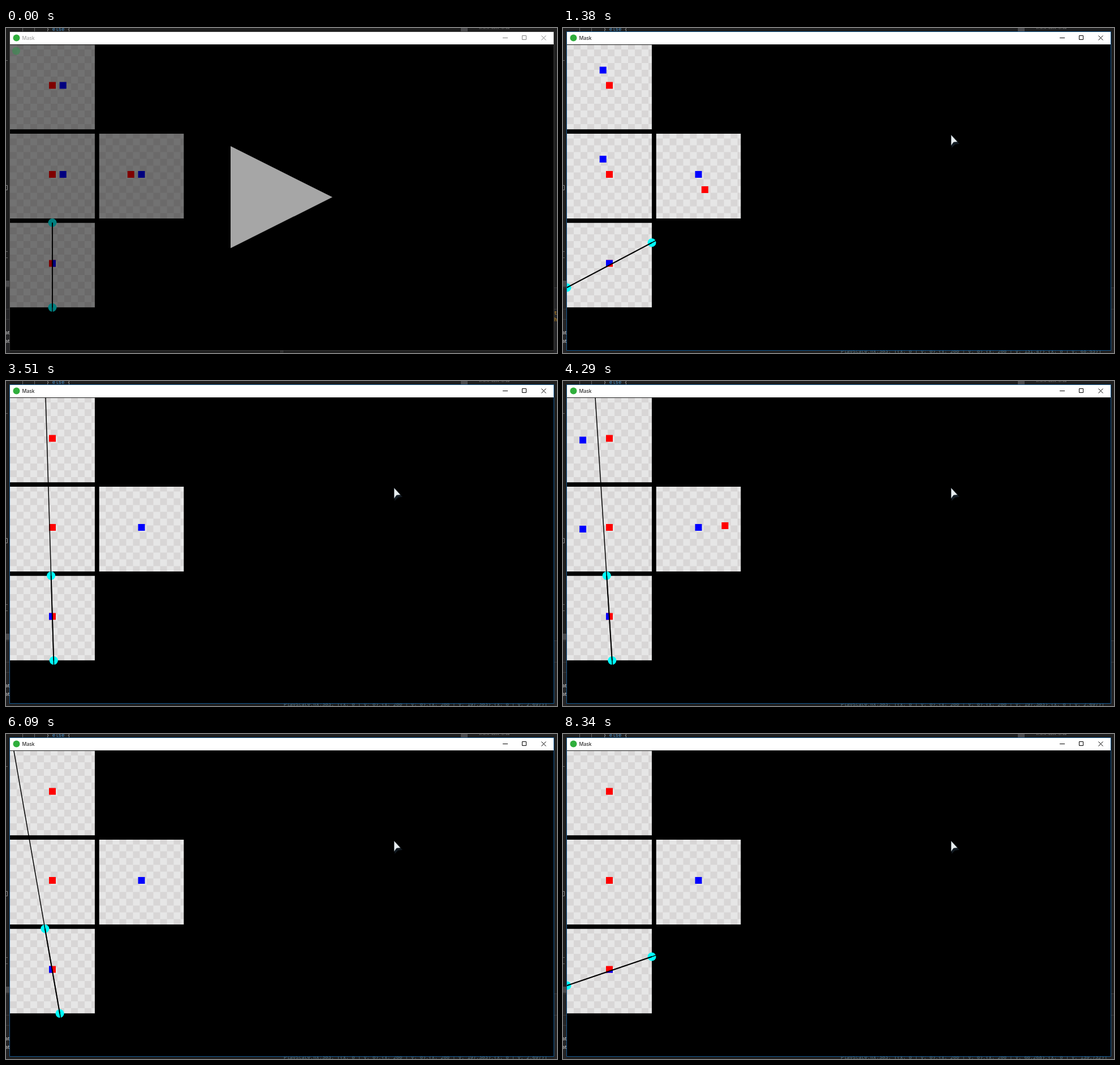
An HTML page for the animation above (8370 ms loop, 974 by 575 pixels).

```html
<!DOCTYPE html>
<html lang="en">
<head>
<meta charset="utf-8">
<title>Mask</title>
<style>
html, body { margin: 0; width: 100%; height: 100%; overflow: hidden; background: #1e1e1e; }
svg { display: block; }
.code { font: 9px "Liberation Mono", monospace; white-space: pre; }
.side { font: 9.5px "Open Sans", sans-serif; fill: #e4e4e4; }
.red { fill: #f00; }
.blue { fill: #00f; }
</style>
</head>
<body>
<svg id="stage" width="974" height="575" viewBox="0 0 974 575">
  <defs>
    <pattern id="checker" width="24" height="24" patternUnits="userSpaceOnUse" y="8.5">
      <path d="M0 0h24v24H0z" fill="#e6e6e6"/>
      <path d="M0 0h12v12H0zM12 12h12v12H12z" fill="#d8d6d6"/>
    </pattern>
    <clipPath id="client"><path d="M7 29.5H968V570H7z"/></clipPath>
    <clipPath id="lineArea"><rect id="lineBox" x="7" width="157.5"/></clipPath>
    <clipPath id="half"><polygon id="halfShape"/></clipPath>
  </defs>

  <!-- editor behind the window -->
  <path d="M0 0H974V575H0z" fill="#1e1e1e"/>
  <path d="M0 460H7V575H0zM968 460h6v115h-6z" fill="#242426"/>
  <path d="M0 459.5h7M0 497.5h7M0 515.5h7M968 459.5h6M968 497.5h6" stroke="#3a3a3c"/>
  <path d="M0 57.5h3M0 395.5h3M0 406.5h3M29.5 0v6M50.5 0v6" stroke="#666"/>
  <path d="M0 278.5h2.5v8H0" fill="none" stroke="#888"/>
  <path d="M0 447h7v11H0zM804 0h12v6h-12z" fill="#4a4a4c"/>
  <text class="code" x="71" y="5" fill="#b8b8b8">} <tspan fill="#4a93cc">else</tspan> {</text>
  <text class="code" x="836" y="2" fill="#777" style="font-size:6px">state.mask.draw</text>
  <text class="side" x="-2" y="542">at</text>
  <text class="side" x="-2" y="557">at</text>
  <g id="warning" class="code" fill="#e09a20"><text x="969" y="507">t</text><text x="969" y="519">h</text></g>
  <path id="grip" d="M485 571.5h5M485 573.5h5" stroke="#666" stroke-dasharray="1 1"/>
  <text id="log" class="code" x="491" y="574.5" fill="#5c7884" style="font-size:8.73px"></text>

  <!-- window -->
  <path d="M7 7H968V570H7z"/>
  <path d="M7 7H968V29H7z" fill="#fff"/>
  <path id="frame" d="M6.5 6.5H968.5V570.5H6.5z" fill="none"/>
  <circle cx="18.5" cy="17.5" r="6" fill="#2fae3c"/>
  <text id="caption" x="28.5" y="21" style="font:8.8px 'Noto Sans',sans-serif">Mask</text>
  <path id="buttons" d="M878 17.5h9M912.5 13.5h7v7h-7zM946.5 13.5l8 8M954.5 13.5l-8 8" fill="none"/>

  <g clip-path="url(#client)">
    <svg x="7" y="29.5" width="150" height="150">
      <path d="M0 0h150v150H0z" fill="url(#checker)"/>
      <path class="red" d="M69 66h12v12H69z"/><path class="blue mover" d="M69 66h12v12H69z"/>
    </svg>
    <svg x="7" y="187" width="150" height="150">
      <path d="M0 0h150v150H0z" fill="url(#checker)"/>
      <path class="red" d="M69 66h12v12H69z"/><path class="blue mover" d="M69 66h12v12H69z"/>
    </svg>
    <svg x="164.5" y="187" width="150" height="150">
      <path d="M0 0h150v150H0z" fill="url(#checker)"/>
      <path id="other" class="red" d="M69 66h12v12H69z"/><path class="blue" d="M69 66h12v12H69z"/>
    </svg>
    <svg x="7" y="344.5" width="150" height="150">
      <path d="M0 0h150v150H0z" fill="url(#checker)"/>
      <path class="red" d="M69 66h12v12H69z"/>
      <g clip-path="url(#half)"><path class="blue" d="M69 66h12v12H69z"/></g>
    </svg>
    <circle id="knobA" r="7.5" fill="#0ff"/>
    <circle id="knobB" r="7.5" fill="#0ff"/>
    <g stroke="#000">
      <path id="ray" stroke-width="1.5" clip-path="url(#lineArea)"/>
      <path id="chord" stroke-width="2"/>
    </g>
    <g id="paused">
      <path d="M7 29H968V570H7z" opacity=".5"/>
      <circle cx="18" cy="40.5" r="7" fill="#3f8a55" opacity=".7"/>
      <path d="M397 209L577 299.3L397 389.5z" fill="#a6a6a6"/>
    </g>
    <g id="cursor">
      <path d="M687 192l14 13-8 1-6 6z" fill="#17212b" opacity=".8"/>
      <path d="M686 189L697.5 201.5L690.5 202L686 208z" fill="#e8eef0" stroke="#26323a" stroke-width=".6"/>
    </g>
  </g>
</svg>
<script>
const LOOP = 8370, STEP = 30, SCALE = 0.75, LAG = 110;
const CX = 82, CY = 419.5;

// time, then the blue square's offset from the red one in world units
const path = [
  [0, 25, 0], [480, 25, 0], [772, 95, 0], [1063, 25, 0], [1213, 25, -36],
  [1705, -93, -36], [2355, -93, 120], [2613, -31, 120], [3096, -31, 4],
  [3759, -190, 4], [4467, -20, 4], [5095, -170, 4], [5650, -170, 135],
  [6398, -170, -44], [7230, 25, -44], [7392, 64, -44], [8340, 64, 188], [8370, 64, 188]
];

const $ = id => document.getElementById(id);
const set = (id, attrs) => {
  for (const k in attrs) $(id).setAttribute(k, attrs[k]);
};
const show = (id, on) => set(id, { visibility: on ? 'visible' : 'hidden' });
const mix = (a, b, k) => `rgb(${a.map((v, i) => Math.round(v + (b[i] - v) * k))})`;
const num = v => String(Math.round(v * 1000) / 1000);

function offset(t) {
  const i = Math.max(1, path.findIndex(p => p[0] >= t));
  const [t0, x0, y0] = path[i - 1], [t1, x1, y1] = path[i];
  const k = (t - t0) / (t1 - t0);
  return [x0 + (x1 - x0) * k, y0 + (y1 - y0) * k];
}

// The trace only grows while the split reaches the left and right sides.
function logText(t) {
  for (let s = t - LAG; s > 1200; s -= STEP) {
    const [x, y] = offset(s);
    if (Math.abs(y) <= Math.abs(x)) continue;
    const d = -100 * x / y;
    return `PlayState.hx:303: [{x: 0 | y: 0},{x: 200 | y: 0},{x: 200 | y: ${num(100 + d)}},{x: 0 | y: ${num(100 - d)}}]`;
  }
  return '';
}

function drawSplit(x, y) {
  const vx = y < 0 ? x - 4 : x, len = Math.hypot(vx, y) || 1;
  const nx = vx / len, ny = y / len, ux = -ny, uy = nx;
  const h = 75 / Math.max(Math.abs(ux), Math.abs(uy));
  const at = k => [CX + ux * k, CY + uy * k];
  const [a, b, far, end] = [at(-h), at(h), at(-900), at(900)];
  set('knobA', { cx: a[0], cy: a[1] });
  set('knobB', { cx: b[0], cy: b[1] });
  set('chord', { d: `M${a}L${b}` });
  set('ray', { d: `M${far}L${end}` });
  const top = x < 0 ? 29 : 344.5;
  set('lineBox', { y: top, height: 502 - top });
  const p = (k, m) => [75 + ux * k + nx * m, 75 + uy * k + ny * m];
  set('halfShape', { points: [p(-200, 0), p(200, 0), p(200, 200), p(-200, 200)].join(' ') });
}

function draw(now) {
  const t = Math.floor(now % LOOP / STEP) * STEP;
  const [x, y] = offset(t), dx = x * SCALE, dy = y * SCALE;
  const focus = Math.min(1, Math.max(0, (t - 60) / 180));

  for (const m of document.querySelectorAll('.mover')) m.setAttribute('transform', `translate(${dx} ${dy})`);
  set('other', { transform: `translate(${-dx} ${-dy})` });
  drawSplit(x, y);

  show('paused', t < 120);
  show('cursor', t >= 90);
  set('frame', { stroke: mix([58, 58, 58], [18, 88, 146], focus) });
  set('caption', { fill: mix([145, 145, 145], [0, 0, 0], focus) });
  set('buttons', { stroke: mix([130, 130, 130], [0, 0, 0], focus) });

  const log = logText(t);
  show('warning', !log);
  show('grip', !log);
  $('log').textContent = log;
}

const start = performance.now();
function tick() {
  draw(performance.now() - start);
  requestAnimationFrame(tick);
}
tick();
</script>
</body>
</html>
```
